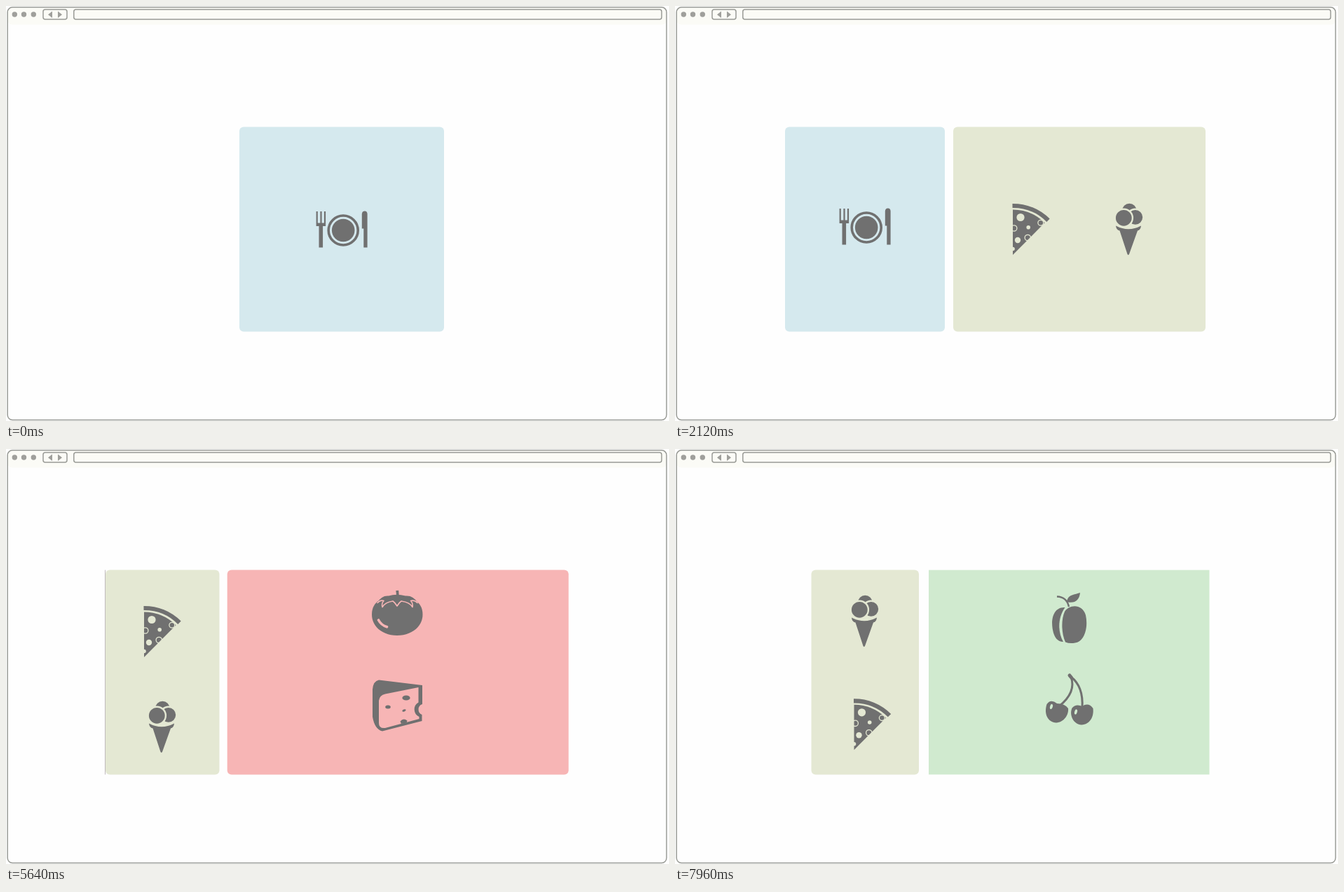
Write an HTML page that moves like this. It is 946 by 592 pixels and loops after 8 s.

```html
<!DOCTYPE html>
<html lang="en">
<head>
<meta charset="utf-8">
<title>Menu panels</title>
<style>
  html, body { margin: 0; width: 100%; height: 100%; overflow: hidden; background: #fefefe; }
  svg { display: block; width: 946px; height: 592px; }
  .line { fill: none; stroke: #999b96; stroke-width: 1.5; }
  .ink { fill: #707070; }
  .rod { fill: none; stroke: #707070; }
  .olive { fill: #e4e8d3; }
  .rose { fill: #f7b5b5; }
  .mint { fill: #d0eacf; }
  .gap { stroke: #e4e8d3; }
</style>
</head>
<body>
<svg viewBox="0 0 946 592">
  <rect width="946" height="592" fill="#fefefe"/>
  <rect x="3" y="3" width="939" height="23.5" rx="5" fill="#fbfbf6"/>
  <rect class="line" x="2.2" y="1.8" width="940.3" height="588.7" rx="7"/>
  <g fill="#9f9f9b">
    <circle cx="12.3" cy="12" r="3.7"/>
    <circle cx="25.5" cy="12" r="3.7"/>
    <circle cx="39.3" cy="12" r="3.7"/>
    <path d="M60 12.2L66 7.4V17ZM80 12.2L74 7.4V17Z"/>
  </g>
  <rect class="line" x="53" y="5" width="34" height="14" rx="3"/>
  <rect class="line" x="96.8" y="5" width="838.7" height="14" rx="3"/>

  <rect id="blue"/>
  <rect id="green" class="olive"/>
  <rect id="red" class="rose"/>
  <rect id="seam" fill="#d9dac8"/>

  <g id="meal" class="ink">
    <path d="M442.6 293h2.2v16.5h3.6v-16.5h2.2v16.5h3.3v-16.5h2.2v21h-4v30.5h-5.6v-30.5h-3.9z"/>
    <circle class="rod" cx="481.2" cy="320" r="21" stroke-width="3.6"/>
    <circle cx="481.2" cy="320" r="16.3"/>
    <path d="M507.8 317.5V296.5Q508.3 292.5 511.8 292.5T515.6 296.5V344.5H510.3V317.5Z"/>
  </g>

  <g id="pizza" class="ink">
    <path class="rod" d="M481.5 285A70.5 70.5 0 0 1 532.5 305.8" stroke-width="6.2"/>
    <path d="M482 290.5A65 65 0 0 1 527.5 309.3L482 355Z"/>
    <g class="olive">
      <circle cx="493" cy="301.5" r="5.6"/>
      <circle cx="504.2" cy="315.7" r="2.8"/>
      <circle cx="489" cy="334" r="4.2"/>
      <circle cx="482" cy="346.5" r="2.8"/>
    </g>
    <g class="gap" fill="none" stroke-width="1.3">
      <circle cx="483.7" cy="317" r="4.2"/>
      <circle cx="521.8" cy="309.3" r="3.9"/>
      <circle cx="503.3" cy="330.5" r="4.2"/>
    </g>
  </g>

  <g id="ice" class="ink">
    <path d="M629 313.5Q647 323 665 313.5Q664.5 319.5 660 320.5L648 354Q646.7 356.3 645.5 354L634.5 320.5Q629.5 319.5 629 313.5Z"/>
    <circle cx="648.3" cy="292" r="10.3"/>
    <g class="gap" stroke-width="2.4">
      <circle cx="656.8" cy="301.3" r="11.6"/>
      <circle cx="640.3" cy="302.3" r="12.6"/>
    </g>
  </g>

  <g id="savoury" class="ink">
    <path d="M522 236C522 217 538 210 558 210S594.500 217 594.500 236C594.500 254 578 266 558 266S522 254 522 236Z"/>
    <path d="M556.3 202L560.2 201.800L561 212H557.5Z"/>
    <path d="M530 219Q536 208.500 546 209.500Q557 206 570 209.500Q581 208.500 587 219Z"/>
    <g fill="none" stroke="#f7b5b5" stroke-linecap="round" stroke-linejoin="round">
      <path stroke-width="1.6" d="M530 219.500Q534 215 539 216.500Q535.500 220 537 225.500Q541 218.500 552 217Q555 219 558 224Q561 219 564 217Q576 218.500 580 225.500Q581 220 577.500 216.500Q583 215 587 219.500"/>
      <path stroke-width="3.6" d="M531.500 244Q535 251 543.500 253.800"/>
    </g>
    <path d="M523 343Q524 331 532 329.500L594 337V364A8 8 0 0 0 593.500 379V388L537 402.500Q526 400 523 382Z"/>
    <path class="rose" d="M532 359Q533 351 541 349.500L588.500 340V361.500A11.500 11.500 0 0 0 589.500 382V385L541 398Q532 399 532 391Z"/>
    <ellipse cx="571" cy="355" rx="5.6" ry="3.6"/>
    <ellipse cx="545" cy="368" rx="3.8" ry="2.5"/>
    <ellipse cx="568" cy="373" rx="2.7" ry="1.5" transform="rotate(-20 568 373)"/>
    <path d="M562.500 388.500Q567 383 572.500 387.500L571.500 390.500L564 392Z"/>
  </g>

  <rect id="fresh"/>
  <g id="fruit" class="ink">
    <path d="M556 232C562 222 581 220 586 237C590 255 584 275 571 276.500Q563 278 557 275.500C551 262 551 243 556 232Z"/>
    <path d="M556.500 226C540 225 536 243 539 258C541 269 546 275 554 275C546 261 546 241 556.500 226Z"/>
    <path d="M559 218C561 207 569 208.500 578 205C577 216 570 221 559 218Z"/>
    <path class="rod" stroke-width="2.4" d="M545 210.500Q559 211 562 225"/>
    <g class="rod" stroke-width="3" stroke-linecap="round">
      <path d="M565 325Q573 347 548 367"/>
      <path d="M565 325Q583 339 581 369"/>
      <path stroke-width="5" d="M563 323L565.500 326"/>
    </g>
    <path d="M545 363Q536 356 530.500 364C526 378 532 390 544 390.500C555 390 562 379 561 370Q556 363 545 363Z"/>
    <path d="M581 367Q572 363 566.500 369.500C562 380 569 393 580 393.500C592 393 598 382 596.500 370Q590 361 581 367Z"/>
    <g class="mint">
      <ellipse cx="537" cy="367.500" rx="1.9" ry="3.7" transform="rotate(15 537 367.500)"/>
      <ellipse cx="572" cy="375" rx="1.9" ry="3.7" transform="rotate(15 572 375)"/>
    </g>
  </g>
</svg>
<script>
const LOOP = 8000, SPAN = 500, STARTS = [950, 3230, 5975];
const TOP = 172.6, HEIGHT = 291.8;
const el = {};
for (const node of document.querySelectorAll('[id]')) el[node.id] = node;

const clamp = v => Math.min(1, Math.max(0, v));
const mix = (a, b, p) => a + (b - a) * p;
const blend = (a, b, p) => `rgb(${a.map((v, i) => Math.round(mix(v, b[i], p)))})`;
const curve = (a, b, s) => 3 * a * s * (1 - s) ** 2 + 3 * b * s * s * (1 - s) + s ** 3;

// cubic-bezier(.25, .1, .25, 1)
function ease(x) {
  if (x <= 0 || x >= 1) return clamp(x);
  let lo = 0, hi = 1;
  for (let i = 0; i < 24; i++) {
    const mid = (lo + hi) / 2;
    if (curve(.25, .25, mid) < x) lo = mid; else hi = mid;
  }
  return curve(.1, 1, lo);
}

function panel(node, left, right, radius = 6) {
  const width = Math.max(0, right - left);
  node.setAttribute('x', left);
  node.setAttribute('y', TOP);
  node.setAttribute('width', width);
  node.setAttribute('height', HEIGHT);
  node.setAttribute('rx', Math.min(radius, width / 2));
}

const shift = (node, x, y) => node.setAttribute('transform', `translate(${x} ${y})`);
const fade = (node, v) => node.setAttribute('opacity', clamp(v));

function draw(t) {
  const u = STARTS.map(s => clamp((t - s) / SPAN));
  const p = u.map(ease);
  const [, b, c] = p;
  // value through the four layouts
  const at = (...k) => p.reduce((v, q, i) => v + (k[i + 1] - k[i]) * q, k[0]);
  const reveal = i => (u[i] - .6) / .3;

  panel(el.blue, at(333, 157, 141, 141), at(625, 385, 142, 142), 6 * (1 - b));
  el.blue.setAttribute('fill', blend([213, 233, 238], [192, 186, 188], b));
  fade(el.blue, 1 - c * 5);
  shift(el.meal, at(0, -208, -338, -338), at(0, -4, -4, -4));
  fade(el.meal, 1 - b * 2.5);

  const edge = at(625, 757, 304.5, 348);
  panel(el.green, at(625, 397, 142, 194.5), edge);
  shift(el.pizza, at(0, 0, -285, -226.5), at(0, 0, -58, 74.3));
  shift(el.ice, at(0, 0, -425, -377), at(0, 0, 78, -73));
  fade(el.pizza, reveal(0));
  fade(el.ice, reveal(0));

  panel(el.red, at(757, 757, 315.7, 315.7), at(757, 757, 802.7, 802.7));
  fade(el.red, (1 - c) ** .8);
  fade(el.savoury, Math.min(clamp(reveal(1)), 1 - c ** 8));
  panel(el.seam, edge - 6, edge, 2);
  fade(el.seam, 5 * c * (1 - c));

  panel(el.fresh, at(762.5, 762.5, 762.5, 362), 762.5, 0);
  el.fresh.setAttribute('fill', blend([189, 165, 161], [208, 234, 207], c));
  fade(el.fresh, c);
  fade(el.fruit, reveal(2));
}

const origin = performance.now();
function tick() {
  draw((performance.now() - origin) % LOOP);
  requestAnimationFrame(tick);
}
tick();
</script>
</body>
</html>
```
